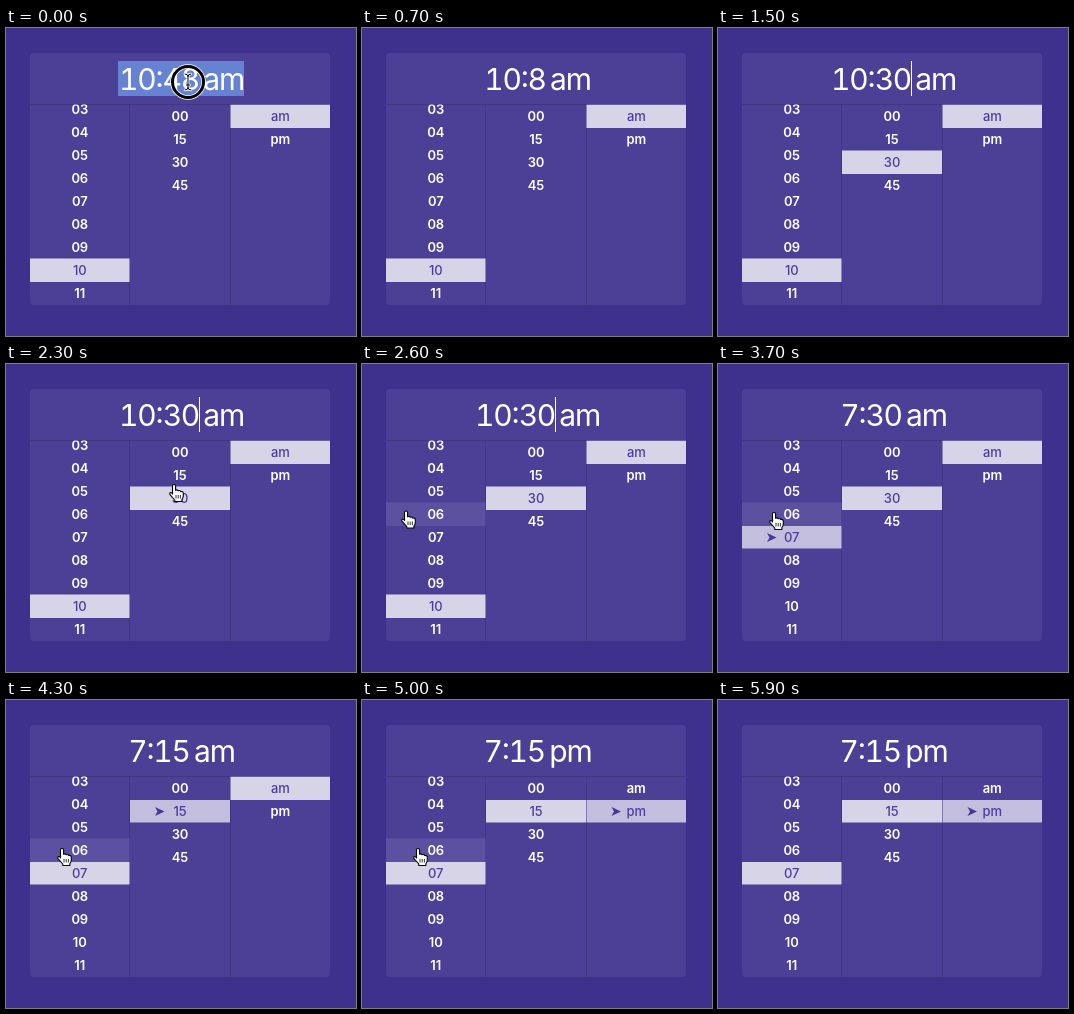
An HTML page that plays this animation: 350 by 308 pixels, repeating every 6.6 s.

```html
<!DOCTYPE html>
<html lang="en">
<head>
<meta charset="utf-8">
<title>Time picker</title>
<style>
html, body { margin: 0; width: 100%; height: 100%; overflow: hidden; background: #3e318d; }
svg { display: block; }
text { font-family: Inter, Roboto, sans-serif; fill: #fff; text-anchor: middle; white-space: pre; }
.time { font-size: 30px; font-weight: 400; letter-spacing: -1.2px; word-spacing: -2.5px; font-feature-settings: "tnum", "case"; }
.row text { font-size: 13px; font-weight: 600; letter-spacing: -.1px; }
.row path { fill: #46379a; visibility: hidden; }
.row rect { fill: none; }
.row.hover rect { fill: #5c51a1; }
.row.on rect { fill: #d8d4e8; }
.row.focus rect { fill: #c3bedd; }
.row.on text { fill: #4b3d9d; font-weight: 500; }
.row.focus path { visibility: visible; }
</style>
</head>
<body>
<svg width="350" height="308" viewBox="0 0 350 308">
  <defs><clipPath id="lists"><rect x="24" y="76.500" width="300" height="200.500"/></clipPath></defs>
  <rect width="350" height="308" fill="#3e318d"/>
  <rect x="24" y="25" width="300" height="252" rx="4" fill="#4b4096"/>
  <path d="M24 76.500H324M123.500 77V277M224.500 77V277" stroke="#403682"/>
  <g id="rows" clip-path="url(#lists)"></g>
  <rect id="selection" x="112" y="33" width="126" height="35" fill="#6683d3"/>
  <text id="time" class="time" x="175.500" y="62"></text>
  <rect id="caret" y="33" width="1" height="35" fill="#fff"/>
  <g id="ring" fill="none">
    <circle r="15.500" stroke="#fff" stroke-width="4.600"/>
    <circle r="15.500" stroke="#000" stroke-width="3"/>
  </g>
  <g id="beam" fill="none" stroke="#fff" stroke-width="2.600" stroke-linecap="round">
    <path d="M-3-8Q0-8 0-5.500Q0-8 3-8M0-6V6M-3 8Q0 8 0 5.500Q0 8 3 8M-1.500 3H1.500"/>
    <path d="M-3-8Q0-8 0-5.500Q0-8 3-8M0-6V6M-3 8Q0 8 0 5.500Q0 8 3 8M-1.500 3H1.500" stroke="#000" stroke-width="1"/>
  </g>
  <g id="hand" stroke="#000" stroke-linejoin="round">
    <path d="M-1.500 1.200Q-1.500-.5 0-.5T1.600 1.200V5.200Q3.200 4.200 4.200 5.800Q6 5 6.800 6.600Q9.200 6 9.300 8.600V11Q9.300 13 7.900 14.600V16.500H.8V15L-4 9.600Q-4.800 8-3.400 7.500Q-2.300 7.400-1.500 8.900Z" fill="#fff" stroke-width="1.100"/>
    <path d="M2 10V13.500M4.200 10V13.500M6.400 10V13.500" stroke-width=".8"/>
  </g>
</svg>
<script>
const LOOP = 6600, STEP = 100, ROW = 23;
const NS = "http://www.w3.org/2000/svg";
const $ = id => document.getElementById(id);

function make(tag, parent, attrs) {
  const el = parent.appendChild(document.createElementNS(NS, tag));
  for (const k in attrs) el.setAttribute(k, attrs[k]);
  return el;
}

const hours = Array.from({ length: 9 }, (_, i) => String(i + 3).padStart(2, "0"));
const columns = [
  { x: 24, w: 99.5, y: 70, labels: hours },
  { x: 124, w: 100, y: 77, labels: ["00", "15", "30", "45"] },
  { x: 224.5, w: 99.5, y: 77, labels: ["am", "pm"] }
];

// Row edges on odd pixels fall half a pixel higher.
const edge = y => y - y % 2 / 2;

const rows = columns.flatMap((c, col) => c.labels.map((label, i) => {
  const y = c.y + i * ROW, top = edge(y);
  const el = make("g", $("rows"), {});
  make("rect", el, { x: c.x, y: top, width: c.w, height: edge(y + ROW) - top });
  make("path", el, { d: `M${c.x + 25} ${y + 7}l9.500 4.500-9.500 4.500 2.500-4.500z` });
  make("text", el, { x: c.x + c.w / 2, y: y + 16 }).textContent = label;
  return { el, col, label };
}));

// Each entry overrides the state from its start time on; caret is a character index.
const timeline = [
  [0, { time: "10:48 am", caret: -1, picked: ["10", "", "am"], focus: -1, selecting: true, hover: false }],
  [100, { selecting: false, caret: 4 }],
  [600, { time: "10:8 am", caret: 3 }],
  [700, { caret: -1 }],
  [900, { time: "10:38 am", caret: 4 }],
  [1100, { caret: 5 }],
  [1400, { time: "10:3 am", caret: 4 }],
  [1500, { time: "10:30 am", caret: 5, picked: ["10", "30", "am"] }],
  [1600, { caret: -1 }],
  [2000, { caret: 5 }],
  [2500, { hover: true }],
  [2700, { caret: -1 }],
  [3000, { time: "6:30 am", picked: ["06", "30", "am"] }],
  [3600, { time: "7:30 am", picked: ["07", "30", "am"], focus: 0 }],
  [3900, { focus: 1 }],
  [4300, { time: "7:15 am", picked: ["07", "15", "am"] }],
  [4700, { focus: 2 }],
  [4900, { time: "7:15 pm", picked: ["07", "15", "pm"] }],
  [5600, { hover: false }]
];

// Time, then the hot spot of the hand.
const pointer = [
  [2000, 184, 115], [2300, 168, 121], [2400, 122, 137], [2500, 72, 146], [2600, 44, 147.5],
  [2700, 41, 149], [2800, 39, 151], [3000, 56, 149], [5600, 152, 149]
];

const show = (id, on) => $(id).setAttribute("visibility", on ? "visible" : "hidden");
const move = (id, x, y) => $(id).setAttribute("transform", `translate(${x} ${y})`);

function draw(t) {
  const s = {};
  for (const [at, change] of timeline) if (t >= at) Object.assign(s, change);

  const time = $("time");
  if (time.textContent !== s.time) time.textContent = s.time;
  show("selection", s.selecting);
  show("caret", s.caret >= 0);
  if (s.caret >= 0) $("caret").setAttribute("x", Math.round(time.getStartPositionOfChar(s.caret).x));

  for (const r of rows) {
    const on = s.picked[r.col] === r.label;
    const hover = s.hover && r.label === "06";
    r.el.setAttribute("class", "row" + (hover ? " hover" : "") + (on ? " on" : "") +
      (on && s.focus === r.col ? " focus" : ""));
  }

  const spot = t < 5700 && pointer.filter(p => t >= p[0]).pop();
  show("hand", spot);
  if (spot) move("hand", spot[1], spot[2]);

  const press = t >= 2900 && t < 3000;
  show("ring", s.selecting || press);
  show("beam", s.selecting);
  if (press) move("ring", spot[1], spot[2]);
  else move("ring", 182, 54);
  move("beam", 182, 54);
}

const start = performance.now();
function tick(now) {
  const ms = Math.max(0, now - start) % LOOP;
  draw(Math.floor(ms / STEP) * STEP);
  requestAnimationFrame(tick);
}
draw(0);
requestAnimationFrame(tick);
</script>
</body>
</html>
```
